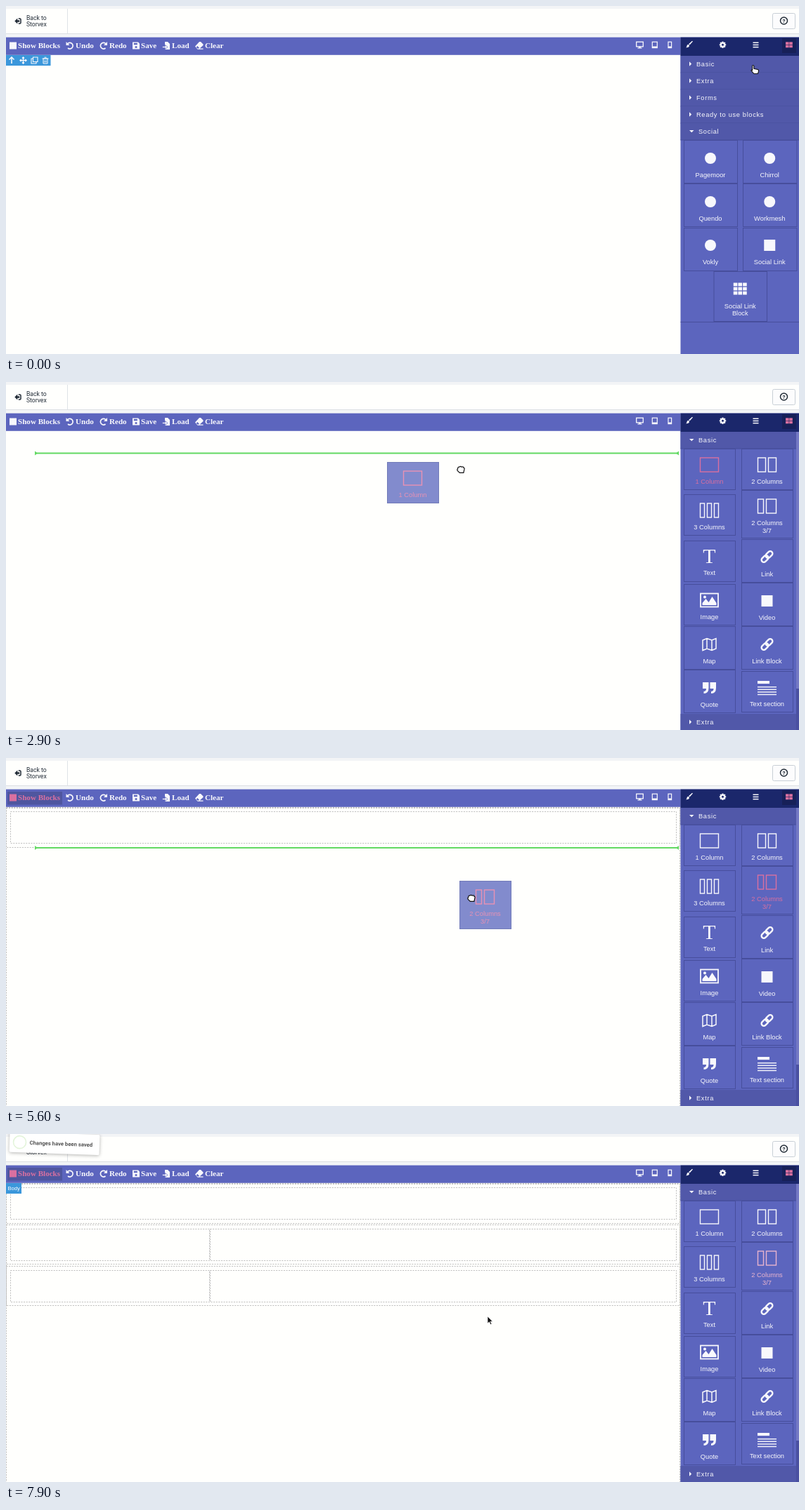
These frames come from a looping animation (1128x496 px, 8 s). An HTML page with a canvas:

```html
<!DOCTYPE html>
<html lang="en">
<head>
<meta charset="utf-8">
<title>Page builder</title>
<style>
html, body { margin: 0; width: 100%; height: 100%; overflow: hidden; background: #fffffd; }
canvas { display: block; }
</style>
</head>
<body>
<canvas id="stage" width="1128" height="496"></canvas>
<script>
const ctx = document.getElementById('stage').getContext('2d');
const LOOP = 8000, STEP = 100, SIDE = 959.5;
const MAIN = '#5c65be', ROW = '#5158a9', LINE = '#474e9c', NAV = '#1b276b', BLUE = '#3b97db';
const GHOST = '#828bcd', GHOST_INK = '#e892b4';
const WHITE = '#f8f8fc', PINK = [217, 112, 160];
const SANS = '"Liberation Sans", Arial, sans-serif';
const SERIF = '"Liberation Serif", "Times New Roman", serif';
const ROBOTO = 'Roboto, sans-serif';

const clamp = v => Math.max(0, Math.min(1, v));
const lerp = (a, b, p) => a + (b - a) * p;
const tint = p => `rgb(${PINK.map((c, i) => lerp([248, 248, 252][i], c, p)).join()})`;

// ---- drawing helpers ----
function rect(x, y, w, h, color) {
  ctx.fillStyle = color;
  ctx.fillRect(x, y, w, h);
}
function frame(x, y, w, h, color, width = 1) {
  ctx.strokeStyle = color;
  ctx.lineWidth = width;
  ctx.strokeRect(x, y, w, h);
}
function dot(x, y, r, color) {
  ctx.fillStyle = color;
  ctx.beginPath();
  ctx.arc(x, y, r, 0, 7);
  ctx.fill();
}
function path(d, x, y, fill, stroke, width = 1, scale = 1) {
  const shape = new Path2D(d);
  ctx.save();
  ctx.translate(x, y);
  ctx.scale(scale, scale);
  if (fill) { ctx.fillStyle = fill; ctx.fill(shape); }
  if (stroke) { ctx.strokeStyle = stroke; ctx.lineWidth = width; ctx.stroke(shape); }
  ctx.restore();
}
// y is the middle of the capitals
function text(s, x, y, size, family, color, { align = 'left', weight = '', spacing = 0 } = {}) {
  ctx.font = `${weight} ${size}px ${family}`;
  ctx.letterSpacing = spacing + 'px';
  ctx.textAlign = align;
  ctx.fillStyle = color;
  ctx.fillText(s, x, y + size * 0.35);
  ctx.letterSpacing = '0px';
}

// ---- block icons, drawn around (x, y) ----
const columns = (...widths) => (x, y, c) => {
  let left = x - 13.5;
  for (const w of widths) {
    frame(left + .5, y - 10, w - 1, 20, c, 1.4);
    left += w + 3;
  }
};
const disc = (x, y, c) => dot(x, y, 8, c);
const square = (x, y, c) => rect(x - 8, y - 8, 16, 16, c);
const letter = (x, y, c) => text('T', x, y, 30, SERIF, c, { align: 'center' });
function link(x, y, c) {
  for (const side of [-1, 1]) {
    ctx.save();
    ctx.translate(x + side * 3, y - side * 3);
    ctx.rotate(-Math.PI / 4);
    ctx.beginPath();
    ctx.roundRect(-5.5, -3.3, 11, 6.6, 3.3);
    ctx.strokeStyle = c;
    ctx.lineWidth = 2.4;
    ctx.stroke();
    ctx.restore();
  }
}
function picture(x, y, c) {
  frame(x - 12.5, y - 9.5, 25, 19, c, 1.8);
  path('M-10 7v-3l5-6 4 5 5-8 6 9v3z', x, y, c);
  dot(x - 6.5, y - 4.5, 2, c);
}
const map = (x, y, c) =>
  path('M-9.5-6l6-2.5 7 2.5 6-2.5v14.5l-6 2.5-7-2.5-6 2.5zM-3.5-8.5v14.5M3.5-6v14.5', x, y, null, c, 1.5);
function quote(x, y, c) {
  for (const dx of [-9.5, 1]) path('M0-8h8.5v8q0 8-7 8v-3q3.5 0 3.5-4h-5z', x + dx, y, c);
}
function section(x, y, c) {
  rect(x - 13.5, y - 10, 17, 4, c);
  for (let i = 0; i < 4; i++) rect(x - 13.5, y - 2 + i * 3.6, 27, 1.4, c);
}
function tiles(x, y, c) {
  for (let i = 0; i < 9; i++) rect(x - 9.5 + i % 3 * 6.7, y - 8.5 + (i / 3 | 0) * 6.1, 5.6, 4.8, c);
}

// left, top, width, height, icon, icon y, label lines, label y
const socialBlocks = [
  [964, 191, 76, 62, disc, 217, ['Pagemoor'], 241],
  [1048, 191, 76.5, 62, disc, 217, ['Chirrol'], 241],
  [964, 253, 76, 62, disc, 279, ['Quendo'], 303],
  [1048, 253, 76.5, 62, disc, 279, ['Workmesh'], 303],
  [964, 316, 76, 62, disc, 341, ['Vokly'], 365],
  [1048, 316, 76.5, 62, square, 341, ['Social Link'], 365],
  [1006.5, 378, 75.5, 72, tiles, 403, ['Social Link', 'Block'], 427.5]
];
const basicBlocks = [
  [964, 95, 73, 59, columns(27), 118, ['1 Column'], 142],
  [1046, 95, 73, 59, columns(12, 12), 118, ['2 Columns'], 142],
  [964, 160, 73, 59, columns(7, 7, 7), 183, ['3 Columns'], 206.5],
  [1046, 154, 73, 69, columns(9, 15), 177, ['2 Columns', '3/7'], 201],
  [964, 226, 73, 59, letter, 247, ['Text'], 272],
  [1046, 224, 73, 62, link, 249, ['Link'], 273.5],
  [964, 288, 73, 59, picture, 311, ['Image'], 335],
  [1046, 286, 73, 62, square, 312, ['Video'], 336],
  [964, 348, 73, 62, map, 374, ['Map'], 398],
  [1046, 348, 73, 62, link, 374, ['Link Block'], 398],
  [964, 410, 73, 62, quote, 436, ['Quote'], 460],
  [1046, 412, 73, 59, section, 436, ['Text section'], 459]
];

function block([x, y, w, h, icon, iconY, lines, labelY], ink = WHITE, back = MAIN, border = LINE) {
  const cx = x + w / 2;
  rect(x, y, w, h, back);
  frame(x + .5, y + .5, w, h - 1, border);
  icon(cx, iconY, ink);
  lines.forEach((s, i) => text(s, cx, labelY + i * 10.7, 9.3, SANS, ink, { align: 'center' }));
}

// ---- timeline ----
// time, x, y of the pointer
const route = [
  [0, 1065, 90], [300, 1065, 90], [400, 1055, 118], [500, 1055, 118], [600, 1022, 190],
  [900, 1020, 189], [1000, 1020, 189], [1200, 1027, 135], [1300, 1019, 96], [1500, 1019, 96],
  [1600, 1020, 90], [1800, 1020, 90], [2000, 1024, 112], [2200, 1010, 148], [2600, 1010, 148],
  [2900, 647, 125], [3000, 588, 167], [3200, 545, 238], [3300, 530, 232], [3600, 130, 88],
  [3800, 38, 62], [4200, 38, 62], [4400, 200, 110], [4700, 1000, 140], [4800, 1075, 135],
  [4900, 1075, 135], [5100, 1063, 179], [5200, 1063, 179], [5600, 662, 200], [5700, 662, 200],
  [5900, 661, 218], [6000, 661, 218], [6500, 1050, 195], [6600, 1072, 190], [6700, 1060, 192],
  [7200, 685, 255], [7500, 685, 255], [7700, 685, 260], [8000, 685, 260]
];
// start, drop, block index, y of the insertion line
const drags = [[2700, 3300, 0, 101.5], [5300, 5800, 3, 128], [6700, 7600, 3, 186.5]];
// block index, from, to
const hovers = [[0, 2100, 3500], [1, 4700, 5000], [3, 5000, 6100], [3, 6500, 7800]];
const toasts = [3480, 5990, 7570];

function pointerAt(t) {
  const i = Math.max(1, route.findIndex(k => k[0] >= t));
  const [t0, x0, y0] = route[i - 1], [t1, x1, y1] = route[i];
  const p = clamp((t - t0) / (t1 - t0));
  return [lerp(x0, x1, p), lerp(y0, y1, p)];
}
const hoverOf = (index, t) => Math.max(0, ...hovers
  .filter(h => h[0] === index)
  .map(([, a, b]) => Math.min(clamp((t - a) / 200), 1 - clamp((t - b) / 200))));

// ---- parts of the page ----
function pageHeader() {
  rect(0, 0, 1128, 496, '#fffffd');
  rect(0, 0, 1128, 4, '#f3f4f6');
  rect(0, 39, 1128, 6, '#f3f5f7');
  rect(0, 39, 1128, 1, '#dcdfe3');
  rect(87, 4, 1, 35, '#dfe2e6');
  path('M0 0l4-4v2.700h3v2.600h-3v2.700z', 12.3, 21.5, '#212b36');
  path('M5.500-3.500h2q1.200 0 1.200 1.200v4.600q0 1.200-1.200 1.200h-2', 12.3, 21.5, null, '#212b36', 1.5);
  text('Back to', 29, 17, 8.6, ROBOTO, '#212b36');
  text('Storvex', 29, 26, 8.6, ROBOTO, '#212b36');
  ctx.beginPath();
  ctx.roundRect(1090.5, 10.5, 32, 22, 2);
  ctx.fillStyle = '#fcfcfd';
  ctx.fill();
  ctx.strokeStyle = '#c8cfd6';
  ctx.lineWidth = 1;
  ctx.stroke();
  path('M5 0A5 5 0 1 1-5 0A5 5 0 1 1 5 0', 1106.5, 21, null, '#212b36', 1.5);
  text('?', 1106.5, 21, 8, ROBOTO, '#212b36', { align: 'center', weight: 'bold' });
}

function toolbar(active) {
  rect(0, 44.6, SIDE, 25.2, MAIN);
  if (active) rect(2, 48, 78, 18.5, '#4f569f');
  const first = tint(active ? 1 : 0);
  const label = (s, x, c = WHITE) => text(s, x, 56.5, 11.1, SERIF, c, { weight: 'bold' });
  rect(5, 51.5, 10, 10, first);
  label('Show Blocks', 17, first);
  const turn = 'M-3.5-2.5A4.3 4.3 0 1 1-3 3.5';
  path(turn, 91, 56.5, null, WHITE, 1.7);
  path('M-5.5-5.5v5h5z', 91, 56.5, WHITE);
  label('Undo', 99);
  ctx.save();
  ctx.translate(138.5, 56.5);
  ctx.scale(-1, 1);
  path(turn, 0, 0, null, WHITE, 1.7);
  path('M-5.5-5.5v5h5z', 0, 0, WHITE);
  ctx.restore();
  label('Redo', 147);
  path('M0 0h8l2 2v8h-10z', 180, 51.5, WHITE);
  rect(181.8, 52.8, 5, 2.4, MAIN);
  dot(185, 58.6, 1.5, MAIN);
  label('Save', 192);
  path('M3-5.5h4l3 3v8h-7z', 223, 56.5, WHITE);
  path('M-.5 1h4v-2l3.5 3-3.5 3v-2h-4z', 223, 56.5, WHITE, MAIN, .7);
  label('Load', 236);
  path('M0 1.5l6-6.5h2l3.5 3.5v1.5l-5 4.500h5v1.200h-8z', 269, 56, WHITE);
  path('M3.300 1l2.600 2.800-.800.800h-1.700l-1.700-1.800z', 269, 56, MAIN);
  label('Clear', 283);

  frame(896.7, 51.2, 9.6, 6.6, WHITE, 1.3);
  rect(900.3, 58, 2.4, 2, WHITE);
  rect(898.5, 59.3, 6, 1.2, WHITE);
  for (const [x, w] of [[919.3, 7], [942, 4.6]]) {
    frame(x, 51.2, w, 8.4, WHITE, 1.2);
    rect(x, 57.5, w, 2, WHITE);
  }
}

function category(s, top, open, right) {
  rect(SIDE, top, right - SIDE, 24, ROW);
  rect(SIDE, top + 23.5, right - SIDE, 1, LINE);
  const y = top + 11.5;
  path(open ? 'M-3-1.5h6.5l-3.2 3.2z' : 'M-1.3-3.2l3.2 3.2-3.2 3.2z', open ? 975 : 973.3, y, WHITE);
  text(s, open ? 985 : 982, y, 9.3, SANS, WHITE, { spacing: .65 });
}

function sidebar(t) {
  rect(SIDE, 44.6, 168.5, 452, MAIN);
  rect(SIDE, 44.6, 168.5, 26.4, NAV);
  rect(1104, 46, 20, 21, '#172058');
  path('M5-4.5l-4.5 5-1.5-1.3 5-4.5zM-1.5-.3l1.5 1.5q0 3.3-4.8 3 1.3-1 1.3-2.5t2-2z', 972, 55, WHITE);
  for (let i = 0; i < 4; i++) {
    ctx.save();
    ctx.translate(1019.5, 55.3);
    ctx.rotate(i * Math.PI / 4);
    rect(-1.1, -4.7, 2.2, 9.4, WHITE);
    ctx.restore();
  }
  dot(1019.5, 55.3, 3.5, WHITE);
  dot(1019.5, 55.3, 1.5, NAV);
  for (const y of [51.5, 54.7, 57.9]) rect(1062.5, y, 8, 1.5, WHITE);
  for (let i = 0; i < 4; i++) rect(1109 + i % 2 * 5.2, 51.3 + (i >> 1) * 4.3, 4.6, 3.7, tint(1));

  if (t < 1700) {
    ['Basic', 'Extra', 'Forms', 'Ready to use blocks', 'Social']
      .forEach((s, i) => category(s, 71 + i * 24, i === 4, 1128));
    socialBlocks.forEach(b => block(b));
    rect(SIDE, 450, 168.5, 1, LINE);
  } else {
    category('Basic', 71, true, 1124);
    basicBlocks.forEach((b, i) => block(b, tint(hoverOf(i, t))));
    category('Extra', 473, false, 1124);
    rect(1124, 71, 4, 366, '#7479c4');
    rect(1124, 437, 4, 59, '#4a50a0');
  }
}

function outlines(t) {
  const cell = (x, y, w, h) => frame(x + .5, y + .5, w, h, '#bdbdbd');
  ctx.save();
  ctx.setLineDash([2, 1.6]);
  cell(0, 70, 958, 440);
  drags.forEach(([, drop], i) => {
    if (t < drop) return;
    const y = 71 + i * 58.5 | 0;
    cell(0, y, 958, 56);
    if (i) {
      cell(6, y + 6, 283, 45);
      cell(290, y + 6, 663, 45);
    } else cell(6, y + 5, 947, 45);
  });
  ctx.restore();
}

function selectionBar() {
  rect(0, 70, 63.5, 15, BLUE);
  path('M0 5v-9M-3.5-.5l3.5-3.7 3.5 3.7', 8, 77, null, WHITE, 1.6);
  path('M-4.5 0h9M0-4.5v9M-3-1.5l-1.5 1.5 1.5 1.5M3-1.5l1.5 1.5-1.5 1.5M-1.5-3l1.5-1.5 1.5 1.5M-1.5 3l1.5 1.5 1.5-1.5', 24.5, 77.5, null, WHITE, 1.3);
  path('M-2-4.5h6.5v6.5h-6.5zM-2-2.5h-2.5v7h7v-2.5', 40.5, 77.5, null, WHITE, 1.1);
  path('M-3-2.5h6v7h-6zM-4.5-2.5h9M-1.5-4.3h3M-1 0v3M1 0v3', 56, 77.5, null, WHITE, 1);
}

function toast(age) {
  // progress, shift, tilt in degrees
  const keys = [[0, -3.8, 2], [.33, 0, -2], [.66, 1.9, 2], [1, 0, 0]];
  const p = clamp(age / 500);
  const i = Math.max(1, keys.findIndex(k => k[0] >= p));
  const [a, b] = [keys[i - 1], keys[i]], f = (p - a[0]) / (b[0] - a[0]);
  ctx.save();
  ctx.translate(69, 12 + lerp(a[1], b[1], f));
  ctx.rotate(lerp(a[2], b[2], f) * Math.PI / 180);
  ctx.translate(-69, -12);
  ctx.shadowColor = 'rgba(0,0,0,.3)';
  ctx.shadowBlur = 5;
  ctx.shadowOffsetY = 1;
  ctx.beginPath();
  ctx.roundRect(5, -3, 128, 29, 2);
  ctx.fillStyle = '#fff';
  ctx.fill();
  ctx.shadowColor = 'transparent';
  path('M9 0A9 9 0 1 1-9 0A9 9 0 1 1 9 0', 19.5, 11.5, null, '#e3f4da', 1.6);
  const drawn = clamp((age - 350) / 150);
  if (drawn) {
    ctx.setLineDash([17 * drawn, 99]);
    path('M-5 .5l3.5 4 6.5-7.5', 19.5, 11.5, null, '#a0db80', 2.1);
  }
  text('Changes have been saved', 33.5, 11.7, 7.7, ROBOTO, '#545454', { weight: 'bold' });
  ctx.restore();
}

function drag([start, , index, lineY], t) {
  rect(43, lineY - 1, 912, 2, '#62d962');
  path('M0-3l4 3-4 3z', 41, lineY, '#62d962');
  path('M0-3l-4 3 4 3z', 957, lineY, '#62d962');
  const [gx, gy] = pointerAt(start - STEP), [x, y] = pointerAt(t + STEP);
  ctx.save();
  ctx.translate(x - gx, y - gy);
  block(basicBlocks[index], GHOST_INK, GHOST, '#727bb8');
  ctx.restore();
}

function pointer(x, y, dragging, blocksOpen) {
  const inPanel = x > SIDE;
  if (dragging) {
    path('M-4-1q0-3 2-2.5 1.5-1.5 3 0 2-1 2.5.8 1.5 0 1 2.2l-1 4.5h-5l-3-3q-.5-2 .5-2z', x, y, '#fff', '#111', 1.1, 1.1);
  } else if (inPanel && blocksOpen && y > 97) {
    const arms = 'M-5 0h10M0-5v10M-3-2l-2 2 2 2M3-2l2 2-2 2M-2-3l2-2 2 2M-2 3l2 2 2-2';
    path(arms, x, y, null, '#fff', 2.8);
    path(arms, x, y, null, '#222', 1.1);
  } else if (inPanel || y < 70) {
    path('M-3.5-5q1.5-1 2 .5v3.5l5 1q1.5.5 1 2.5l-1 3h-5l-3.5-4q0-1.5 1.5-.5z', x + .5, y + .5, '#fff', '#111', 1, 1.1);
  } else {
    path('M0 0v10l2.4-2.2 1.8 3.8 1.6-.8-1.8-3.6h3.2z', x, y, '#111', '#fff', .6);
  }
}

function draw(t) {
  const [x, y] = pointerAt(t);
  const active = drags.find(([start, drop]) => t >= start && t < drop);
  pageHeader();
  toolbar(t >= 3800);
  if (t >= 3900) outlines(t);
  if (t < 2700) selectionBar();
  else if (!active && x < SIDE && y > 70) {
    rect(0, 70, 22, 15, BLUE);
    text('Body', 2.5, 77.5, 7.6, SANS, '#fff');
  }
  sidebar(t);
  if (active) drag(active, t);
  const shown = toasts.find(s => t >= s && t < s + 1100);
  if (shown) toast(t - shown);
  pointer(x, y, active, t >= 1700);
}

function tick(now) {
  draw(Math.floor(now % LOOP / STEP) * STEP);
  requestAnimationFrame(tick);
}
requestAnimationFrame(tick);
</script>
</body>
</html>
```
